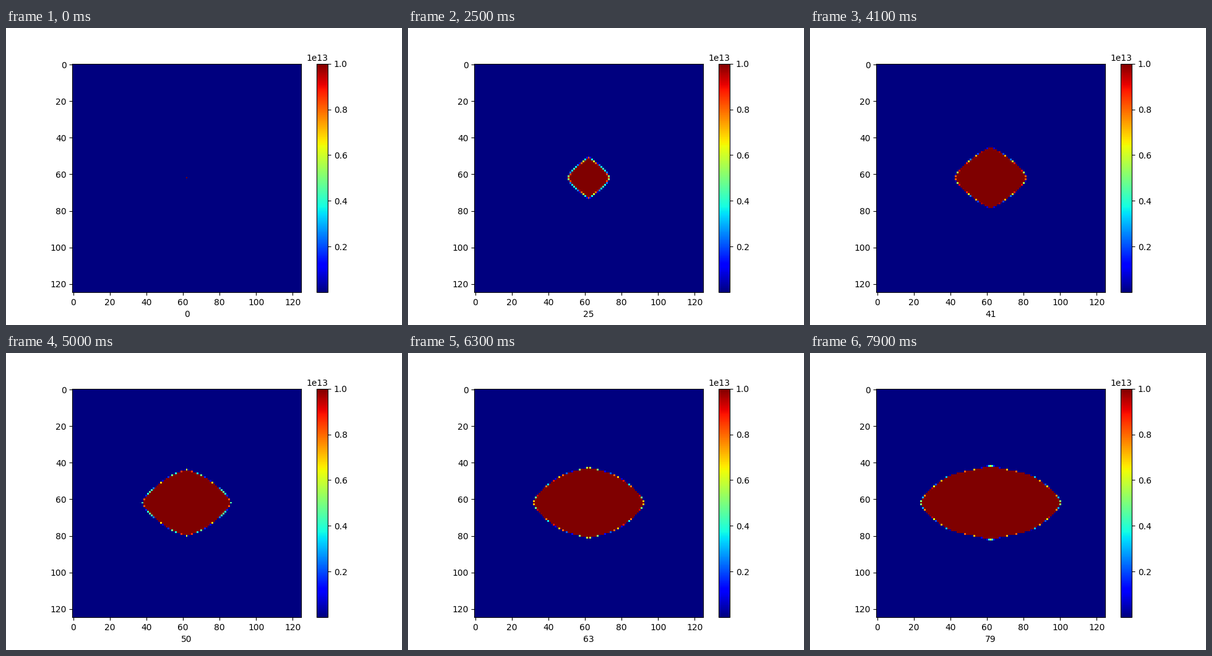
These frames come from a looping animation (640 by 480 pixels, 8000 ms). A matplotlib script:

```python
import numpy as np
import matplotlib.pyplot as plt
from matplotlib.animation import FuncAnimation

SIZE, MID, STEPS = 125, 62, 80
CAPACITY = 1e13
PACE = 2.03    # steps per cell along the middle row
LIMIT = 20     # rows from the middle where growth stalls

y, x = np.abs(np.mgrid[:SIZE, :SIZE] - MID).astype(float)
stall = 2.0 ** (np.minimum(y, LIMIT + 3) - LIMIT)

# Step at which each cell starts to fill: rows lag behind the middle one,
# evenly in all directions near the seed, and stall towards the limit.
lag = .54 * y**1.5 + 23 * stall
lag += np.maximum(0, PACE * y - lag) * np.exp(-x / 6)
drag = .45 * 3.5 ** (np.minimum(y, LIMIT - 1) - LIMIT + 1)
start = .75 + PACE * x + lag + drag * x**2

# Cells fill slowly at first and again near the limit.
duration = 1.1 + 12 * np.exp(-start / 10) + 10 * stall


def density(step):
    fill = np.clip((step - start) / duration, 0, 1)
    fill[MID, MID] = 1
    return CAPACITY * fill


fig, ax = plt.subplots(figsize=(6.4, 4.8), dpi=100)
image = ax.imshow(density(0), cmap="jet", vmin=2.5e-4 * CAPACITY,
                  vmax=CAPACITY, interpolation="nearest")
fig.colorbar(image, ax=ax)
label = ax.set_xlabel("0")


def update(step):
    image.set_data(density(step))
    label.set_text(str(step))
    return image, label


anim = FuncAnimation(fig, update, frames=STEPS, interval=100,
                     repeat=True, repeat_delay=0, blit=False)
plt.show()
```
